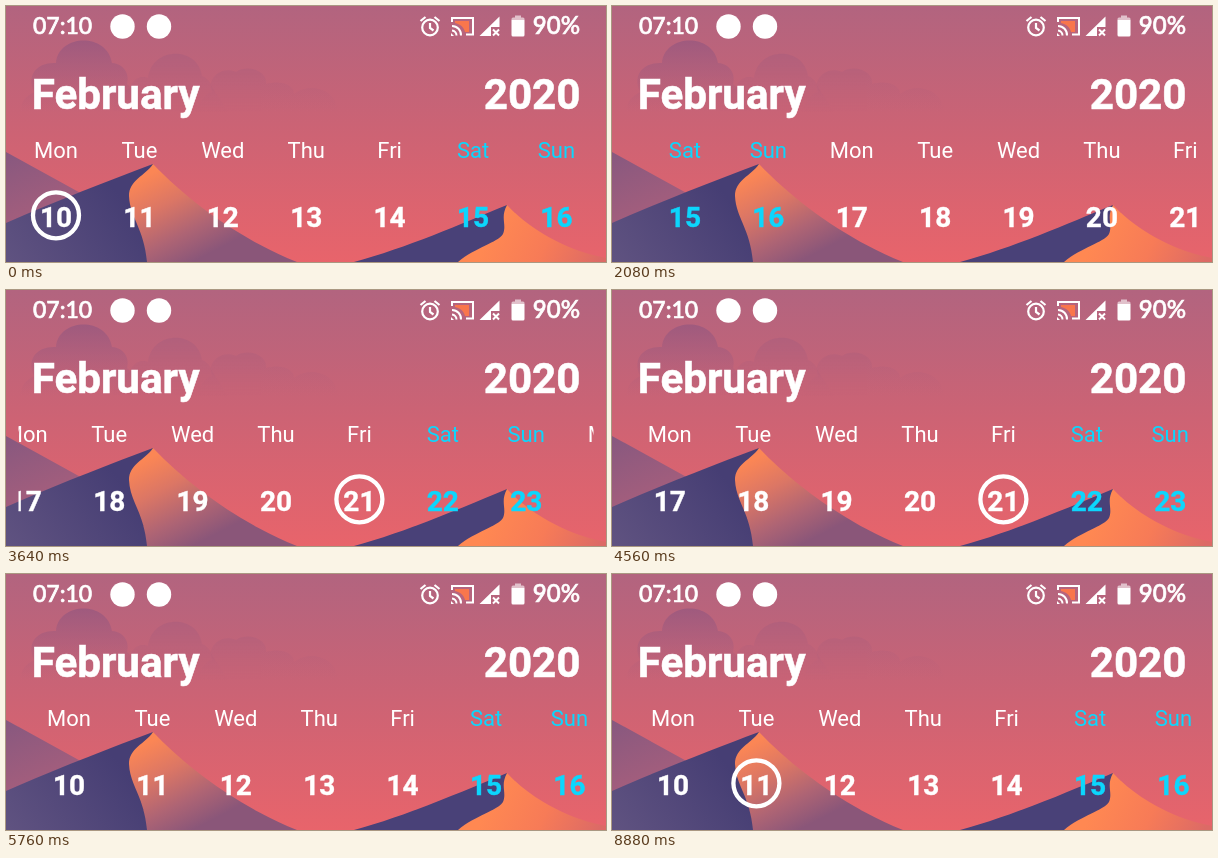
Write an HTML page that moves like this. It is 600 px wide and 256 px high and loops after 8.92 s.

```html
<!DOCTYPE html>
<html lang="en">
<head>
<meta charset="utf-8">
<title>Single row calendar</title>
<style>
  html, body { margin: 0; width: 100%; height: 100%; overflow: hidden; background: #cd6275; }
  svg { display: block; width: 100%; height: 100%; }
  text { font-family: Roboto, "Liberation Sans", sans-serif; fill: #fff; }
  .status { font: 500 23px Lato, "Open Sans", sans-serif; stroke: #fff; stroke-width: .7; }
  .title { font-size: 42.2px; font-weight: 700; stroke: #fff; stroke-width: .6; }
  .name { font-size: 22px; text-anchor: middle; }
  .date { font-size: 28px; font-weight: 700; text-anchor: middle; stroke: #fff; stroke-width: .4; }
  .ring { fill: none; stroke: #fff; stroke-width: 4.3; }
  .weekend text { fill: #0cd6fd; }
  .weekend .date, .weekend .ring { stroke: #0cd6fd; }
</style>
</head>
<body>
<svg viewBox="0 0 600 256" preserveAspectRatio="none">
  <defs>
    <linearGradient id="sky" x2="0" y2="1">
      <stop stop-color="#b2647f"/><stop offset=".5" stop-color="#cd6374"/><stop offset="1" stop-color="#e8646b"/>
    </linearGradient>
    <linearGradient id="cloud" gradientUnits="userSpaceOnUse" x1="0" y1="34" x2="0" y2="106">
      <stop stop-color="#93567f" stop-opacity=".7"/><stop offset="1" stop-color="#a85c7c" stop-opacity="0"/>
    </linearGradient>
    <linearGradient id="far" gradientUnits="userSpaceOnUse" x1="0" y1="146" x2="30" y2="225">
      <stop stop-color="#87587f"/><stop offset="1" stop-color="#a95f7c"/>
    </linearGradient>
    <linearGradient id="shade" gradientUnits="userSpaceOnUse" x1="110" y1="185" x2="10" y2="262">
      <stop stop-color="#463e74"/><stop offset="1" stop-color="#5f5280"/>
    </linearGradient>
    <linearGradient id="sand" gradientUnits="userSpaceOnUse" x1="130" y1="175" x2="175" y2="262">
      <stop stop-color="#fb8655"/><stop offset=".35" stop-color="#db7665"/><stop offset=".7" stop-color="#ae6474"/><stop offset="1" stop-color="#8a5679"/>
    </linearGradient>
    <linearGradient id="sand2" gradientUnits="userSpaceOnUse" x1="490" y1="215" x2="590" y2="262">
      <stop stop-color="#ff8852"/><stop offset=".5" stop-color="#f77b57"/><stop offset="1" stop-color="#dc6a66"/>
    </linearGradient>
    <clipPath id="strip"><rect x="12.500" y="120" width="575" height="136"/></clipPath>
  </defs>

  <rect width="600" height="256" fill="url(#sky)"/>
  <g fill="url(#cloud)">
    <path d="M14 106C16 92 22 90 28 86C20 68 32 56 50 57C52 28 101 26 106 57C118 58 124 68 121 78C130 86 136 94 136 106Z"/>
    <g opacity=".5">
      <path d="M106 106C108 92 116 86 124 82C128 70 138 70 142 72C146 40 192 40 196 70C206 74 206 84 212 90L222 106Z"/>
      <path d="M190 106C196 92 200 88 206 86C200 70 218 60 230 66C240 58 262 64 260 78C274 74 288 78 288 88C306 74 332 86 331 104L331 106Z"/>
    </g>
  </g>

  <path d="M0 146L80 190L0 219Z" fill="url(#far)"/>
  <path d="M0 217C50 195 104 174 147 158L160 256H0Z" fill="url(#shade)"/>
  <path d="M147 158C184 197 238 235 291 256H141C138 222 124 212 123 190C123 174 139 170 147 158Z" fill="url(#sand)"/>
  <path d="M348 256C400 242 455 218 501 199L504 256Z" fill="#494178"/>
  <path d="M501 199C524 224 562 245 600 252V256H452C470 241 491 237 497 228C501 218 494 212 501 199Z" fill="url(#sand2)"/>

  <text class="status" x="27" y="28">07:10</text>
  <circle cx="116.500" cy="20.500" r="12.200" fill="#fff"/>
  <circle cx="153" cy="20.500" r="12.200" fill="#fff"/>
  <g fill="none" stroke="#fff" stroke-width="2.200">
    <circle cx="424" cy="21.500" r="7.800"/>
    <path d="M424 17V22L427.500 24.500M414.500 15L419.500 11M433.500 15L428.500 11"/>
  </g>
  <path d="M449 15H463V26H459C458 21 454 18 449 17Z" fill="#f9764c"/>
  <g fill="none" stroke="#fff" stroke-width="2">
    <path d="M446 16V12H467V28.500H460M446 20A9 9 0 0 1 455 29.500M446 24.500A5 5 0 0 1 450.500 29.500"/>
  </g>
  <path d="M445 27L448 30H445Z" fill="#fff"/>
  <path d="M493.500 10.500V21H485V30H473.500Z" fill="#fff"/>
  <path d="M487 23.500L493 29.500M493 23.500L487 29.500" stroke="#fff" stroke-width="2"/>
  <path d="M509 11.500V9.500H515V11.500H517Q518.500 11.500 518.500 13V14H505.500V13Q505.500 11.500 507 11.500Z" fill="#fff" opacity=".6"/>
  <path d="M505.500 14H518.500V29Q518.500 30.500 517 30.500H507Q505.500 30.500 505.500 29Z" fill="#fff"/>
  <text class="status" x="574" y="28" text-anchor="end" style="font-size:24px">90%</text>

  <text class="title" x="25.700" y="103">February</text>
  <text class="title" x="574.500" y="103" text-anchor="end">2020</text>
  <g clip-path="url(#strip)"><g id="days"></g></g>
</svg>
<script>
  const LOOP = 8920;
  const SPACING = 83.4;
  const FIRST_X = 50;
  const FIRST_DATE = 10;
  const NAMES = ["Sat", "Sun", "Mon", "Tue", "Wed", "Thu", "Fri"];

  // Swipes: start ms, end ms, target offset in px
  const swipes = [
    [1867, 2400, 614],
    [3800, 4160, 576],
    [5200, 5740, -13],
    [5780, 5960, -11]
  ];
  // Taps: ms, selected date
  const taps = [[0, 10], [2440, 22], [3400, 21], [6700, 13], [7800, 11]];

  const strip = document.getElementById("days");

  function add(parent, tag, attrs, content = "") {
    const node = document.createElementNS("http://www.w3.org/2000/svg", tag);
    for (const key in attrs) node.setAttribute(key, attrs[key]);
    node.textContent = content;
    return parent.appendChild(node);
  }

  const rings = new Map();
  for (let date = 1; date <= 29; date++) {
    const weekday = (date - 1) % 7;
    const x = FIRST_X + (date - FIRST_DATE) * SPACING;
    const group = add(strip, "g", {
      class: weekday < 2 ? "weekend" : "weekday",
      transform: `translate(${x} 0)`
    });
    add(group, "text", { class: "name", y: 151.5 }, NAMES[weekday]);
    add(group, "text", { class: "date", y: 220.5 }, date);
    rings.set(date, add(group, "circle", { class: "ring", cy: 209.3, r: 23 }));
  }

  const easeOut = p => 1 - (1 - p) ** 2;

  function offsetAt(time) {
    let offset = 0;
    for (const [start, end, target] of swipes) {
      if (time < start) break;
      const p = Math.min(1, (time - start) / (end - start));
      offset += (target - offset) * easeOut(p);
    }
    return offset;
  }

  function selectedAt(time) {
    return taps.filter(([start]) => start <= time).pop()[1];
  }

  function render(time) {
    strip.setAttribute("transform", `translate(${-offsetAt(time)} 0)`);
    const selected = selectedAt(time);
    rings.forEach((ring, date) => {
      ring.setAttribute("visibility", date === selected ? "visible" : "hidden");
    });
  }

  const begin = performance.now();
  function tick() {
    render((performance.now() - begin) % LOOP);
    requestAnimationFrame(tick);
  }
  tick();
</script>
</body>
</html>
```
